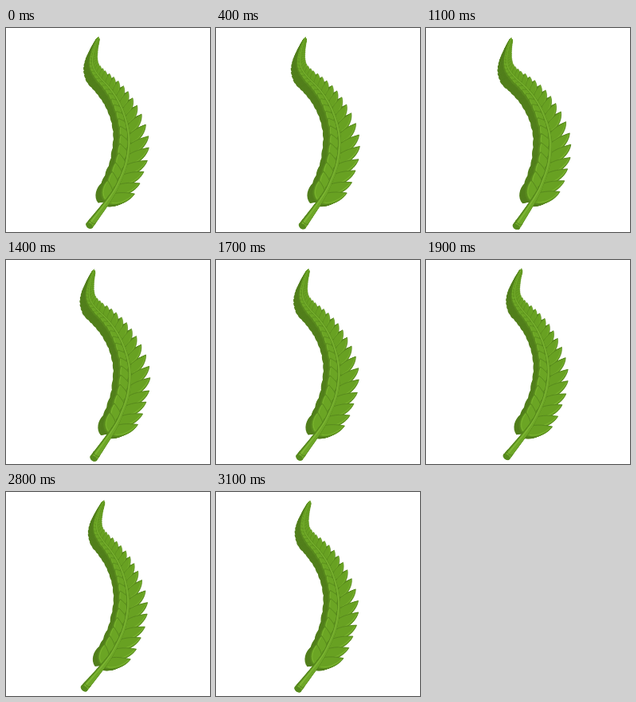
An HTML page with a canvas that plays this animation: 256x256 px, repeating every 3.2 s.

```html
<!DOCTYPE html>
<html lang="en">
<head>
<meta charset="utf-8">
<title>Swaying fern</title>
<style>
  html, body { margin: 0; width: 100%; height: 100%; overflow: hidden; background: #fff; }
  canvas { display: block; width: 100vmin; height: 100vmin; }
</style>
</head>
<body>
<canvas id="stage"></canvas>
<script>
const SIZE = 256, LOOP = 3200, STEP = 100, TILT = 0.078;
const canvas = document.getElementById('stage');
const ctx = canvas.getContext('2d');
const density = Math.max(1, window.devicePixelRatio || 1);
canvas.width = canvas.height = SIZE * density;

const COLOR = {
  side: '#527f1c', sideLight: '#598a1e', edge: '#56871d',
  face: '#68a122', faceLeft: '#6ba524', bevel: '#7ab42f',
  rib: '#6ea728', ribLight: '#7fb736', cap: '#568a1d'
};

// Control points of the rib, from the cut stem up to the tip.
const knots = [[104.5, 248], [122, 225], [132, 211], [139.5, 198], [149.5, 174],
  [154, 150], [153.5, 130], [148, 108], [139.5, 89], [129, 74], [118, 62],
  [110.5, 51], [108.5, 40], [111, 26], [116, 11.5]];

function spline(points, perSpan = 12) {
  const at = i => points[Math.max(0, Math.min(points.length - 1, i))];
  const out = [];
  for (let i = 0; i < points.length - 1; i++) {
    for (let k = 0; k < perSpan; k++) {
      const t = k / perSpan;
      out.push([0, 1].map(c => {
        const [a, b, d, e] = [at(i - 1)[c], at(i)[c], at(i + 1)[c], at(i + 2)[c]];
        return b + t * (d - a) / 2 + t * t * (a - 2.5 * b + 2 * d - e / 2)
          + t * t * t * (1.5 * (b - d) + (e - a) / 2);
      }));
    }
  }
  out.push(points[points.length - 1]);
  return out;
}

const rib = spline(knots);
const travelled = [0];
for (let i = 1; i < rib.length; i++) {
  travelled.push(travelled[i - 1]
    + Math.hypot(rib[i][0] - rib[i - 1][0], rib[i][1] - rib[i - 1][1]));
}
const total = travelled[travelled.length - 1];
const leafy = total - 41;

function pointAt(distance) {
  let i = 1;
  while (i < rib.length - 1 && travelled[i] < distance) i++;
  const [a, b] = [rib[i - 1], rib[i]];
  const t = (distance - travelled[i - 1]) / (travelled[i] - travelled[i - 1]);
  return {
    x: a[0] + (b[0] - a[0]) * t,
    y: a[1] + (b[1] - a[1]) * t,
    angle: Math.atan2(b[1] - a[1], b[0] - a[0])
  };
}

// A leaf whose point bends towards the tip of the fern; side is 1 right, -1 left.
function makeLeaf(base, left, side) {
  const u = left / leafy;
  const full = Math.min(33, 0.185 * left + 2.5, 0.5 * left + 1);
  const length = side > 0 ? full : full * 0.73;
  const width = full * 0.2 + 0.6;
  const spread = side > 0 ? 1 - 0.2 * u : 0.5 + 0.25 * u * u;
  const angle = base.angle + side * spread;
  const cos = Math.cos(angle), sin = Math.sin(angle);
  const place = (along, across) => [
    base.x + along * length * cos - side * across * width * sin,
    base.y + along * length * sin + side * across * width * cos
  ];
  const outline = new Path2D(), bevel = new Path2D();
  outline.moveTo(...place(0, -0.6));
  outline.bezierCurveTo(...place(0.25, -1.2), ...place(0.65, -0.8), ...place(1, -0.25));
  outline.bezierCurveTo(...place(0.8, 0.8), ...place(0.35, 1.5), ...place(0, 0.8));
  outline.closePath();
  bevel.moveTo(...place(0.1, 0.65));
  bevel.bezierCurveTo(...place(0.35, 1.1), ...place(0.7, 0.6), ...place(0.92, -0.1));
  const depth = Math.min(left / 40, 1 + 0.8 * Math.max(0, 1 - left / 120));
  return { outline, bevel, side, depth, scale: full / 33 };
}

const leaves = [];
for (let left = leafy; left > 2; left -= Math.min(13.2, 0.08 * left + 1)) {
  const base = pointAt(total - left);
  leaves.unshift(makeLeaf(base, left, -1), makeLeaf(base, left, 1));
}

function drawSides(sway) {
  const layers = 12;
  for (let k = layers; k > 0; k--) {
    const amount = k / layers;
    ctx.fillStyle = k > 2 ? COLOR.side : COLOR.sideLight;
    for (const leaf of leaves) {
      const reach = amount * leaf.depth * (leaf.side > 0 ? 0.8 : 1);
      ctx.save();
      ctx.translate((-7.8 - 1.2 * sway) * reach, 3.5 * reach);
      ctx.fill(leaf.outline);
      ctx.restore();
    }
  }
}

function drawLeaves() {
  for (const leaf of leaves) {
    ctx.fillStyle = leaf.side > 0 ? COLOR.face : COLOR.faceLeft;
    ctx.fill(leaf.outline);
    ctx.strokeStyle = COLOR.edge;
    ctx.lineWidth = 0.3 + 0.6 * leaf.scale;
    ctx.stroke(leaf.outline);
    ctx.strokeStyle = COLOR.bevel;
    ctx.lineWidth = 0.2 + 0.8 * leaf.scale;
    ctx.stroke(leaf.bevel);
  }
}

function strokeRib(color, widthScale, shift) {
  ctx.strokeStyle = color;
  for (let i = 1; i < rib.length; i++) {
    const left = total - travelled[i];
    const width = 1.2 + 4.3 * left / total + 4.5 * Math.max(0, 1 - travelled[i] / 60);
    ctx.lineCap = i > 1 ? 'round' : 'butt';
    ctx.lineWidth = width * widthScale;
    ctx.beginPath();
    ctx.moveTo(rib[i - 1][0] + shift * width, rib[i - 1][1] + shift * width * 0.6);
    ctx.lineTo(rib[i][0] + shift * width, rib[i][1] + shift * width * 0.6);
    ctx.stroke();
  }
}

function drawStem() {
  strokeRib(COLOR.edge, 1, 0);
  strokeRib(COLOR.rib, 0.75, 0.06);
  strokeRib(COLOR.ribLight, 0.18, -0.1);
  const end = pointAt(0);
  ctx.save();
  ctx.translate(end.x, end.y);
  ctx.rotate(end.angle);
  ctx.fillStyle = COLOR.cap;
  ctx.beginPath();
  ctx.ellipse(0, 0, 3, 5, 0, 0, 2 * Math.PI);
  ctx.fill();
  ctx.strokeStyle = COLOR.edge;
  ctx.lineWidth = 0.9;
  ctx.beginPath();
  ctx.ellipse(7, 0, 2.4, 4.6, 0, Math.PI / 2, 1.5 * Math.PI);
  ctx.stroke();
  ctx.restore();
}

// A short rest, then one full swing in steps of a tenth of a second.
function swayAt(time) {
  const step = Math.floor((time % LOOP) / STEP);
  return Math.sin(2 * Math.PI * Math.max(0, step - 2) / 30);
}

function draw(time) {
  const sway = swayAt(time);
  ctx.setTransform(density, 0, 0, density, 0, 0);
  ctx.clearRect(0, 0, SIZE, SIZE);
  ctx.translate(SIZE / 2, SIZE / 2);
  ctx.scale(1 + 0.02 * sway, 1);
  ctx.rotate(-TILT * sway);
  ctx.translate(-SIZE / 2, -SIZE / 2);
  ctx.lineJoin = 'round';
  drawSides(sway);
  drawLeaves();
  drawStem();
}

const start = performance.now();
function tick() {
  draw(performance.now() - start);
  requestAnimationFrame(tick);
}
tick();
</script>
</body>
</html>
```
